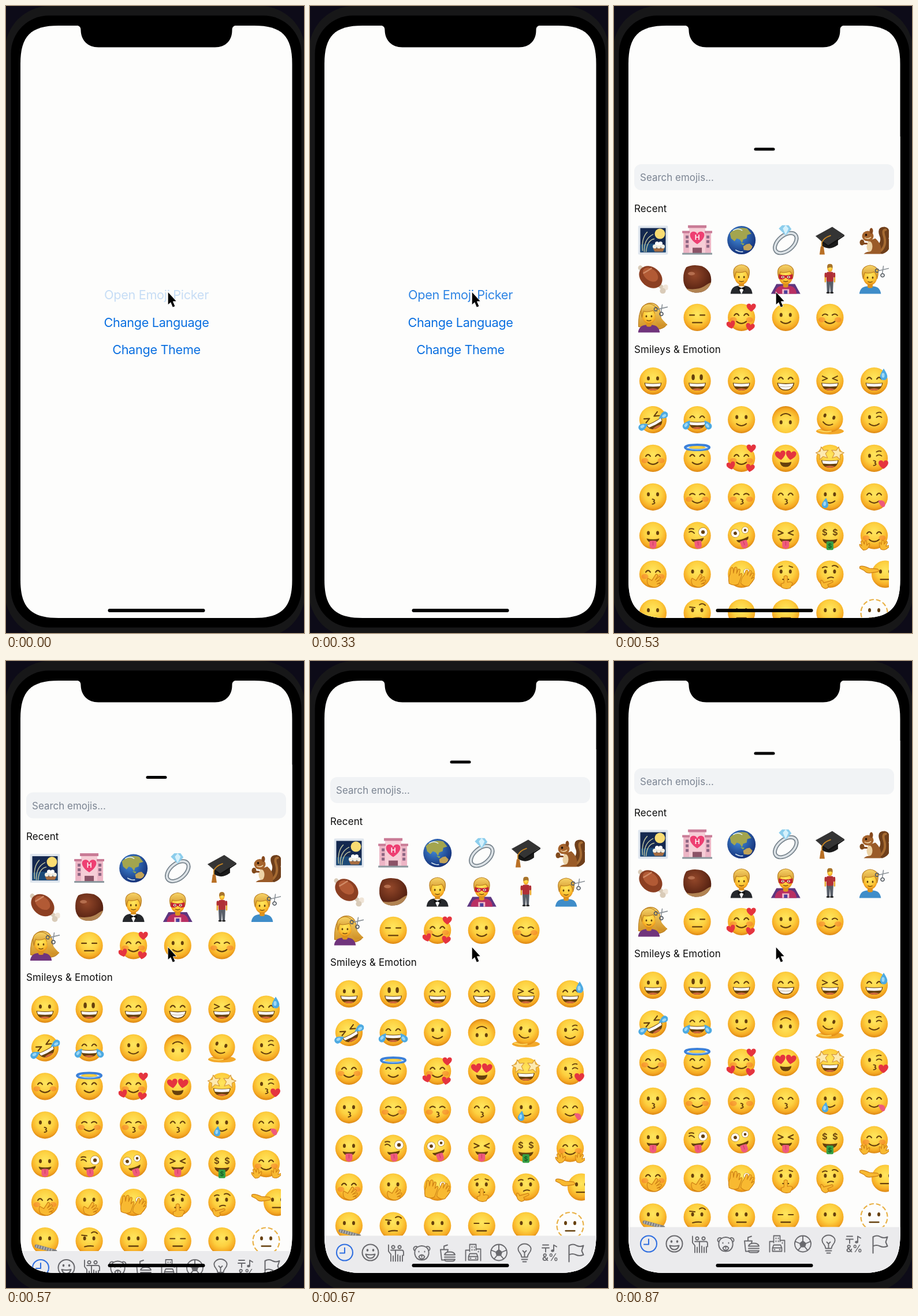
Animation of 516x1086 px, one loop 0.9 s. Source, as an HTML page:

```html
<!DOCTYPE html>
<html lang="en">
<head>
<meta charset="utf-8">
<title>Emoji picker</title>
<style>
html, body { margin: 0; width: 100%; height: 100%; overflow: hidden; background: #0d0b18; }
svg { display: block; width: 100vw; height: 100vh; font-family: Inter, Roboto, sans-serif; }
.link { font-size: 21.7px; letter-spacing: -.34px; fill: #0a6fe0; text-anchor: middle; }
.label { font-size: 16.9px; letter-spacing: .18px; fill: #0c0c0c; }
</style>
</head>
<body>
<svg viewBox="0 0 516 1086">
  <defs>
    <radialGradient id="skin" cx=".5" cy=".38" r=".64">
      <stop offset="0" stop-color="#ffe65e"/><stop offset=".5" stop-color="#fdd040"/>
      <stop offset=".8" stop-color="#f6ab24"/><stop offset="1" stop-color="#d67f10"/>
    </radialGradient>
    <radialGradient id="sea" cx=".4" cy=".35" r=".7">
      <stop offset="0" stop-color="#4590de"/><stop offset="1" stop-color="#122c74"/>
    </radialGradient>
    <radialGradient id="nut" cx=".4" cy=".35" r=".7">
      <stop offset="0" stop-color="#94482a"/><stop offset="1" stop-color="#4d1c0e"/>
    </radialGradient>
    <linearGradient id="hair" x2="0" y2="1">
      <stop offset="0" stop-color="#f7d468"/><stop offset="1" stop-color="#cf8f25"/>
    </linearGradient>
    <clipPath id="screen"><path d="M25 100C25 52 43 34 91 34H429.5C477.5 34 495.5 52 495.5 100V994C495.5 1042 477.5 1060 429.5 1060H91C43 1060 25 1042 25 994Z"/></clipPath>
    <clipPath id="list"><path d="M25 75H476V820.5H25Z"/></clipPath>
    <clipPath id="cell"><path d="M-26-26H26V26H-26Z"/></clipPath>
  </defs>
  <rect x="-2" y="0" width="520" height="1094" rx="78" fill="#171718"/>
  <rect x="8.5" y="16.5" width="503" height="1060" rx="66"/>
  <g clip-path="url(#screen)">
    <rect width="516" height="1086" fill="#fdfdfc"/>
    <text class="link" id="open" x="260.5" y="508">Open Emoji Picker</text>
    <text class="link" x="260.5" y="555.5">Change Language</text>
    <text class="link" x="260.5" y="603">Change Theme</text>
    <g id="sheet">
      <rect x="25" y="-22" width="471" height="1100" fill="#fdfdfc"/>
      <rect x="242.5" y="-2.5" width="36" height="5" rx="2.5"/>
      <rect x="35" y="26" width="450" height="45" rx="12" fill="#f1f3f5"/>
      <text class="label" x="45" y="55" style="fill:#7b8492;letter-spacing:.04px">Search emojis...</text>
      <g clip-path="url(#list)">
        <g id="recent"><text class="label" x="35" y="108.5">Recent</text></g>
        <g id="smileys"><text class="label" x="35" y="108.5">Smileys &amp; Emotion</text></g>
      </g>
      <rect x="25" y="820.5" width="471" height="270" fill="#ebebed"/>
      <g id="tabs"></g>
    </g>
  </g>
  <path d="M120 33C127 34 129.5 36 129.5 42C130 60 142 71.5 160 71.5H362C380 71.5 391.5 60 391.5 42C391.5 36 394 34 401 33Z"/>
  <rect x="176.5" y="1044" width="168" height="6" rx="3"/>
  <path d="M280.7 496V517L285.2 513L288.8 521.6L292.4 520L288.8 511.6L294.6 511.2Z" stroke="#fff" stroke-width="1.4" paint-order="stroke"/>
</svg>
<script>
const $ = id => document.getElementById(id);
const INK = '#66400d', GOLD = '#f8b931', EDGE = '#cd7f14', RED = '#e5343f', PINK = '#ef5a7c', HAIR = 'url(#hair)', GRAY = '#6a6a6e';

const fill = (d, c = INK) => `<path d="${d}" fill="${c}"/>`;
const line = (d, w = 2.1, c = INK, more = '') =>
  `<path d="${d}" fill="none" stroke="${c}" stroke-width="${w}" stroke-linecap="round" stroke-linejoin="round" ${more}/>`;
const oval = (x, y, rx, ry = rx, c = INK) => `<ellipse cx="${x}" cy="${y}" rx="${rx}" ry="${ry}" fill="${c}"/>`;
const box = (x, y, w, h, c, r = 0) => `<rect x="${x}" y="${y}" width="${w}" height="${h}" rx="${r}" fill="${c}"/>`;
const put = (s, x, y, turn = 0, k = 1) => `<g transform="translate(${x} ${y}) rotate(${turn}) scale(${k})">${s}</g>`;
const type = (s, x, y, size, c) =>
  `<text x="${x}" y="${y}" font-size="${size}" font-weight="600" text-anchor="middle" fill="${c}">${s}</text>`;
const both = f => f(-1) + f(1);
const stroked = (d, c = GOLD, edge = EDGE) => fill(d, c) + line(d, 1.1, edge);
const dashes = (d, w, c, gap) => line(d, w, c, `stroke-dasharray="${gap}" style="stroke-linecap:butt"`);

// Face parts, centred on the face
const ball = oval(0, 0, 23.6, 23.6, 'url(#skin)');
const face = (...parts) => ball + parts.join('');
const eye = s => oval(8 * s, -4.5, 2.5, 3.5);
const dots = both(eye);
const arcs = line('M-12.5-3.5q4-6 8 0M4.5-3.5q4-6 8 0');
const shut = line('M-13-3.5q4-4.5 9-.5M13-3.5q-4-4.5-9-.5');
const squint = line('M-13-8.5l8.5 4l-8.5 3.5M13-8.5l-8.5 4l8.5 3.5');
const flatEyes = line('M-13-4h8M5-4h8');
const wink = eye(-1) + line('M4-4q4-4 9 0M4-11q4-3 8-1', 1.8);
const blush = both(s => oval(14 * s, 4, 6, 4.5, 'rgba(240,92,40,.38)'));
const smile = line('M-8.5 7Q0 14 8.5 7');
const flat = line('M-8 9H8', 2.3);
const kiss = line('M-1 4q6 1 2 4q5 3-2 4.5', 1.9);
const jaw = 'M-15 3Q0 5 15 3Q13 16.5 0 16.5Q-13 16.5-15 3Z';
const laugh = fill(jaw) + fill('M-13.5 3.9Q0 6 13.5 3.9Q13 7.5 12 9Q0 10.5-12 9Q-13 7.5-13.5 3.9Z', '#fff')
  + fill('M-9 14.5Q0 11 9 14.5Q5 16.5 0 16.5Q-5 16.5-9 14.5Z', '#d2683c');
const beam = fill(jaw) + fill('M-13.4 4.2Q0 6.4 13.4 4.2Q11 15 0 15Q-11 15-13.4 4.2Z', '#fff') + line('M-12 9.5Q0 11 12 9.5', 1, '#b9a992');
const tongue = fill('M-11 5Q0 8 11 5Q10 12 0 12Q-10 12-11 5Z')
  + fill('M-6 9.5Q0 8 6 9.5V17a6 6 0 0 1-12 0Z', PINK) + line('M0 10v7', 1, '#c73860');
const heart = (x, y, k = 1, turn = 0, c = RED) =>
  put(fill('M0 7C-11 0-9-7-4-7Q-1-7 0-4Q1-7 4-7C9-7 11 0 0 7Z', c), x, y, turn, k);
const star = (x, y, turn) =>
  put(stroked('M0-11L3-4L11-3L5 2L7 10L0 6L-7 10L-5 2L-11-3L-3-4Z', '#fdeab0', '#d3973d'), x, y, turn);
const drop = (x, y, turn = 0, k = 1) =>
  put(fill('M0-10Q6-1 6 3A6 6 0 0 1-6 3Q-6-1 0-10Z', '#4daae2') + oval(-1, 1, 2.5, 4, '#9dd8f5'), x, y, turn, k);
const bigEye = (x, y, r) => oval(x, y, r + .6, r + .6, '#a87624') + oval(x, y, r, r, '#fff') + oval(x, y, r * .42);
const palm = stroked('M-9 11Q-13 3-10-1L-3 3L4-8Q8-8 7-4L3 2L10-4Q13-3 11 0L5 5L13 2Q15 4 12 6L6 9L11 8Q12 11 9 12Q3 18-9 11Z');
const hug = s => put(stroked('M-4 9Q-9 2-9-2Q-7-4-5 1L-5-7Q-3-9-1-6L0-1L3-7Q6-7 5-3L4 2L9-1Q11 1 8 4Q4 11-4 9Z'), 17 * s, 16, 12 * s, .95);
const peek = stroked('M-9 13Q-12 4-9-2L-9-11Q-7-14-5-11L-4-4L-3-13Q0-15 1-12L1-4L3-11Q6-12 6-9L5-1L8-5Q11-4 9 0L6 12Q0 17-9 13Z');

const loving = face(blush, arcs, smile, heart(17, -17), heart(-18, 13, .95, -15), heart(15, 17, .95, 10));
const calm = face(blush, shut, smile);
const smiling = face(dots, smile);
const blank = face(flatEyes, flat);

const smileys = [
  face(dots, laugh),
  face(both(s => oval(7 * s, -6.5, 2.8, 5)), laugh),
  face(arcs, laugh),
  face(arcs, beam),
  face(squint, laugh),
  face(arcs, laugh, drop(16.5, -11, 0, 1.05)),

  put(face(squint, laugh), 0, 0, -28) + drop(-17, 12, 60, .95) + drop(18, -7, 238, .95),
  face(arcs, laugh, drop(-18, 9, 35, .95), drop(18, 9, -35, .95)),
  smiling,
  put(smiling, 0, 0, 180),
  oval(0, 20, 24, 5.5, '#f3a92a') + put(ball, 0, -1, 0, .96) + put(dots + smile, -2, -1, 14) + line('M-20 18q10 4 22 2', 2, '#fbd55c'),
  face(wink, smile),

  face(blush, arcs, smile),
  face(arcs, smile, '<ellipse cy="-19" rx="21" ry="4.5" fill="none" stroke="#3c80d8" stroke-width="4"/>', line('M-18-18q18 6 36 0', 1.2, '#9fd0ff')),
  loving,
  face(heart(-9, -5, 1.12, -8), heart(9, -5, 1.12, 8), fill('M-10 6Q0 9 10 6Q9 15 0 15Q-9 15-10 6Z')),
  face(laugh, star(-13, -9, -12), star(13, -9, 12)),
  face(wink, kiss, heart(16, 11, 1.05)),

  face(dots, kiss),
  calm,
  face(blush, shut, kiss),
  face(arcs, kiss),
  face(dots, smile, drop(-8, 11, 8, .95)),
  face(arcs, smile, put(fill('M-5-4Q2-7 6-2Q9 6 3 7Q-1 6-5-4Z', PINK), 12, 11)),

  face(dots, tongue),
  face(line('M-14-6q5-3 9 2M-14-11q4-2 8 0', 1.9), bigEye(10, -6, 7.5), put(tongue, 0, 0, -6)),
  put(face(bigEye(-9, -7, 7), bigEye(9, -7, 5.5), tongue), 0, 0, -18),
  face(squint, tongue),
  face(type('$', -9, 0, 15, INK), type('$', 9, 0, 15, INK), fill('M-13 6Q0 9 13 6Q11 15 0 15Q-11 15-13 6Z'), box(-6, 10, 12, 15, '#36a044', 2), type('$', 0, 21.5, 11, '#145a24')),
  face(blush, arcs, smile, both(hug)),

  face(blush, arcs, put(palm, 1, 8)),
  face(dots, put(palm, 1, 8)),
  face(bigEye(9, -4, 5), put(peek, -10, 3, 6, 1.1), put(peek, 12, 7, 22)),
  face(dots, line('M-12-12l6-2M6-14l6 2', 1.9), line('M-5 9h10'), stroked('M-3 4Q0 1 3 4L3 14Q10 12 12 16L8 24Q0 27-7 23L-8 17L-3 15Z')),
  face(dots, line('M-13-11q4-3 8-1M4-14q5-3 10 2', 1.9), line('M-4 7q5-3 10-1'), stroked('M-16 11Q-13 9-11 15L3 11Q6 11 5 14L-4 18Q0 24-8 25Q-17 23-16 11Z')),
  put(face(dots, flat), 19, 0) + stroked('M-25-13Q-21-16-8-10L6-9Q10-6 6-4L-8-2Q-14-2-17-6L-25-10Z'),

  face(dots, line('M-15 9Q0 13 18 18', 6, '#858585'), dashes('M-15 9Q0 13 18 18', 5, '#d6d6d6', '1 3.5'), line('M16 17l7 6', 4, '#777')),
  face(dots, line('M-13-10l9 1M4-14q5-4 10 1'), line('M-8 10q8-2 15-1')),
  face(dots, flat),
  blank,
  face(dots),
  dashes('M-23 0a23 23 0 1 0 46 0a23 23 0 1 0-46 0', 2.2, '#e9b146', '8 4.04') + dots + flat
];

const scissors = line('M11-22l-2 13M20-18L3-14', 1.6, '#8b9298') + line('M9-9a3 3 0 1 0 1 0M3-14a3 3 0 1 0-1 2', 1.7, '#555c63');
const bust = shirt => fill('M-19 27Q-18 13-6 12H6Q18 13 19 27Z', shirt) + box(-4.5, 7, 9, 8, '#dc9320', 3)
  + oval(0, -4, 12, 14, 'url(#skin)')
  + stroked('M-12-1Q-17-17-8-22Q0-27 8-22Q17-17 12-1Q11-10 7-13Q-3-9-9-12Q-11-8-12-1Z', HAIR, '#b97d20')
  + both(s => oval(4.5 * s, -3, 1.4, 1.9)) + line('M-3.5 4q3.5 2 7 0', 1.4);
const windows = [-20, 16].map(x => [-8, 0, 8].map(y => box(x, y, 5, 5, '#8d6682')).join('')).join('');
const band = (w, c) => `<ellipse rx="22" ry="13" fill="none" stroke="${c}" stroke-width="${w}"/>`;

const recents = [
  // Moon viewing
  box(-26, -25, 52, 50, '#dfe6ee', 2) + box(-22, -21, 44, 42, '#14284f') + oval(12, -11, 9, 9, '#f9dc72')
    + fill('M-22 8Q0 3 22 10V21H-22Z', '#1c4a78') + line('M-15 20Q-16-2 0-10M-12 20Q-10 0 2-2M-18 18Q-20-4-10-14', 1.5, '#b8bd9c')
    + fill('M0 14H20L17 20H3Z', '#a66c40') + [3, 10, 17].map(x => oval(x, 11, 3.5, 3.5, '#f3eee2')).join('') + oval(7, 6, 3.5, 3.5, '#fff') + oval(13, 6, 3.5, 3.5, '#fff'),
  // Hotel
  box(-24, -14, 48, 38, '#edb5c5') + box(-14, -24, 28, 48, '#f6cdd6') + fill('M-26-16H-13V-12H-26ZM13-16H26V-12H13ZM-16-26H16V-21H-16Z', '#c97b96')
    + windows + box(-8, 13, 16, 11, '#8b5367') + box(-26, 22, 52, 3, '#8a979d')
    + heart(0, -4, 1.55, 0, '#ee3f72') + type('H', 0, -1, 12, '#fff'),
  // Globe
  oval(0, 0, 24.5, 24.5, 'url(#sea)') + fill('M-20-12Q-8-25 10-20L17-11L10-9L9-3L3-1L1 5L-3-1L-8-3L-12 2L-18-3Z', '#a3a54e')
    + fill('M3 11L9 7L14 6L19 11Q17 18 11 18L4 17Z', '#c2a358') + fill('M-2 5L5 6L3 9Z', '#8eab50') + line('M-14-17q8-5 15 0M-10 17q7 4 12 3', 1.6, '#dcecf4'),
  // Ring
  put(band(7, '#77838c') + band(3.5, '#dde3e7'), 0, 5, -40)
    + fill('M-12-20L-6-26H5L10-19L0-8Z', '#8ccdec') + fill('M-5-20L0-26L5-20L0-9Z', '#d5f1fc'),
  // Cap
  fill('M-14-2V10Q0 19 14 8V-3L0 6Z', '#1b1b1b') + fill('M-25-7L4-23L25-9L-3 9Z', '#343434') + fill('M-25-7L-3 9L25-9V-7L-3 12Z', '#111')
    + line('M1-8Q-11-4-14 4V14', 1.8, '#c98624') + fill('M-16 11H-11L-9 25H-18Z', '#b97025'),
  // Squirrel
  fill('M6 23C-2 12 16 6 9-8Q4-23 18-23Q30-21 25-3Q33 17 14 24Z', '#6f3f1b') + line('M12 18Q22 8 17-8Q14-18 20-18', 4, '#a66b32')
    + fill('M-18 24Q-14 20-8 20Q-16 12-9 1L2-3Q15 8 11 24Z', '#9a5b28') + oval(-8, 11, 5, 9, '#edd2a4') + oval(-11, -7, 10, 9, '#a5632c')
    + oval(-5, -16, 3, 5, '#85481d') + oval(-14, -9, 1.8, 2, '#1d0f05') + line('M-16-4q6 3 10-1', 1.5, '#edd2a4') + line('M-13 6l-8 0', 3, '#85481d') + oval(-21, 4, 4, 5, '#814a1c'),
  // Meat
  line('M4 5L19 18', 7, '#d9cbb8') + oval(22, 15, 5, 5, '#efe4d6') + oval(17, 21, 5, 5, '#d9cbb8') + line('M-16-13l-6-6', 8, '#d9cbb8')
    + put(oval(0, 0, 22, 17, '#8c3f22') + oval(-3, -3, 15, 10, '#b25a35'), -4, -3, 40) + line('M-16-10Q-9-14-3-18', 2.5, '#d08a66'),
  // Chestnut
  fill('M-19-20Q-8-26 8-22Q26-14 24 6Q18 25-4 24Q-25 20-24-2Q-24-12-19-20Z', 'url(#nut)') + fill('M24 6Q18 25-4 24Q-14 23-19 17Q0 20 12 13Q19 8 24 6Z', '#b18352') + oval(-10, -9, 6, 3, '#b56e4e'),
  // Tuxedo
  bust('#26282c') + fill('M-6 13H6L0 27Z', '#fff') + fill('M-6 13L0 16L6 13V20L0 17L-6 20Z', '#111'),
  // Hero
  fill('M-26 27L-16 9H16L26 27Z', '#5e3680') + bust('#b92f63') + fill('M-12-8Q0-4 12-8V0Q5 3 0-2Q-5 3-12 0Z', '#c32232')
    + both(s => oval(5 * s, -3, 2.6, 2, '#fff') + oval(5 * s, -3, 1.2)) + fill('M-6 18H6V27H-6Z', '#f6bdcb') + fill('M-3 20H3V27H-3Z', '#4b409b'),
  // Standing
  fill('M-6 3H6L5 24H1L0 9L-1 24H-5Z', '#585e68') + line('M-8-7V5M8-7V5', 2.6, '#e9a62b') + box(-6, -12, 12, 17, '#b02f36', 3) + line('M-7.5-9v5M7.5-9v5', 3.4, '#b02f36')
    + oval(0, -18, 4.5, 6, 'url(#skin)') + fill('M-4.5-18Q-6-26 0-26Q6-26 4.5-18Q2-22-4.5-18Z', '#a8742a') + both(s => oval(3.2 * s, 24, 3, 1.6, '#272727')),
  // Haircuts
  put(bust('#3f8dc9'), -7, 1) + put(scissors, 5, 0),
  stroked('M-25 16Q-26-24-4-25Q12-24 13-4Q15 12 24 12Q16 24-4 19Z', HAIR, '#b97d20') + put(bust('#70347c'), -7, 1) + fill('M2-20Q9-3 25 13Q12 20 5 9Z', HAIR) + put(scissors, 5, 0),
  blank, loving, smiling, calm
];

const ring = 'M-14 0a14 14 0 1 0 28 0a14 14 0 1 0-28 0';
const tabs = [
  line(ring + 'M0-8V1H-8'),
  line(ring + 'M-8 3Q0 5 8 3Q6 10 0 10Q-6 10-8 3Z') + both(s => oval(5 * s, -4, 1.8, 2.3)),
  line('M-5-12a2.6 2.6 0 1 0 .1 0M6-12a2.6 2.6 0 1 0 .1 0M-9 15V3L-13-2V-13M-9-4H10Q13-4 13 0V5M-5 6V15M-1-3V15M3 4V15M7 6V15M11 5V15', 1.9),
  line('M-8-9Q0-14 8-9Q13-5 12 3Q10 13 0 13Q-10 13-12 3Q-13-5-8-9M-8-10a4 4 0 1 0-4 7M8-10a4 4 0 1 1 4 7M-5 7Q0 1 5 7Q4 11 0 11Q-4 11-5 7M-5-2v1M5-2v1M0 6v2', 1.9),
  line('M-10 13L-12-5H1L0-1M-6-5V-11L0-13M-10 13H-6M-5 4Q-4-1 4-1Q12-1 13 4ZM-5 8H13M-5 12H13Q12 15 9 15H-1Q-5 15-5 12', 1.9),
  line('M-13 14V-4H-6M-6-2V-14H5V-4M5-6H13V14M-8 13V7L-6 2H6L8 7V13ZM-8 7H8M-2-10v1M2-10v1M-2-5v1M2-5v1M9-2v1M-5 10h1M4 10h1', 1.8),
  line(ring + 'M0-6V-13M6-1L13-4M4 6L8 11M-4 6L-8 11M-6-1L-13-4', 1.9) + fill('M0-6L6-1L4 6H-4L-6-1Z'),
  line('M-5 8Q-5 5-8 1Q-13-5-10-10Q-6-15 0-15Q6-15 10-10Q13-5 8 1Q5 5 5 8ZM-5 12H5M-3 16H3M-3-3L0 0L3-3M0 0V8', 1.9),
  line('M-13-13H-3M-14-8H-2M-8-8V-1M6-3V-13L11-10', 1.9) + oval(4, -3, 2.7, 2.2) + type('&amp;%', 0, 14.5, 17, INK),
  line('M-12 16V-12Q-5-16 1-12Q7-9 13-12L10-3L13 4Q6 7 0 4Q-6 1-12 4')
];

const grid = list => list.map((s, i) =>
  `<g transform="translate(${67.5 + i % 6 * 76.6} ${157.6 + Math.floor(i / 6) * 66.9})" clip-path="url(#cell)">${s}</g>`).join('');
$('smileys').innerHTML += grid(smileys);
$('recent').innerHTML += grid(recents);
$('tabs').innerHTML = tabs.map((s, i) => put(s.replaceAll(INK, i ? GRAY : '#306fe0'), 60 + i * 44.5, 849.5)).join('');

const LOOP = 900, STEP = 100 / 3;
// Sheet height as [step, y]
const rise = [[11, 1110], [12, 1010], [13, 760], [14, 501], [15, 345], [16, 248], [17, 201.5], [20, 175], [22, 163], [24, 160.5], [26, 160]];
const clamp = v => Math.min(1, Math.max(0, v));

function sheetY(n) {
  let y = rise[0][1];
  for (let i = 1; i < rise.length; i++) {
    const [a, from] = rise[i - 1], [b, to] = rise[i];
    if (n >= a) y = from + (to - from) * clamp((n - a) / (b - a));
  }
  return y;
}

function draw(now) {
  const n = Math.floor((now % LOOP + 3.4) / STEP);
  const u = clamp((n * STEP - 162) / 250);
  const ease = u < .5 ? 2 * u * u : 1 - 2 * (1 - u) ** 2;
  const loaded = n >= 16;
  $('open').setAttribute('opacity', .22 + .78 * ease);
  $('sheet').setAttribute('transform', `translate(0 ${sheetY(n)})`);
  $('recent').setAttribute('visibility', loaded ? 'visible' : 'hidden');
  $('smileys').setAttribute('transform', `translate(0 ${loaded ? 244 : 0})`);
}

const start = performance.now();
function tick() {
  draw(performance.now() - start);
  requestAnimationFrame(tick);
}
tick();
</script>
</body>
</html>
```
